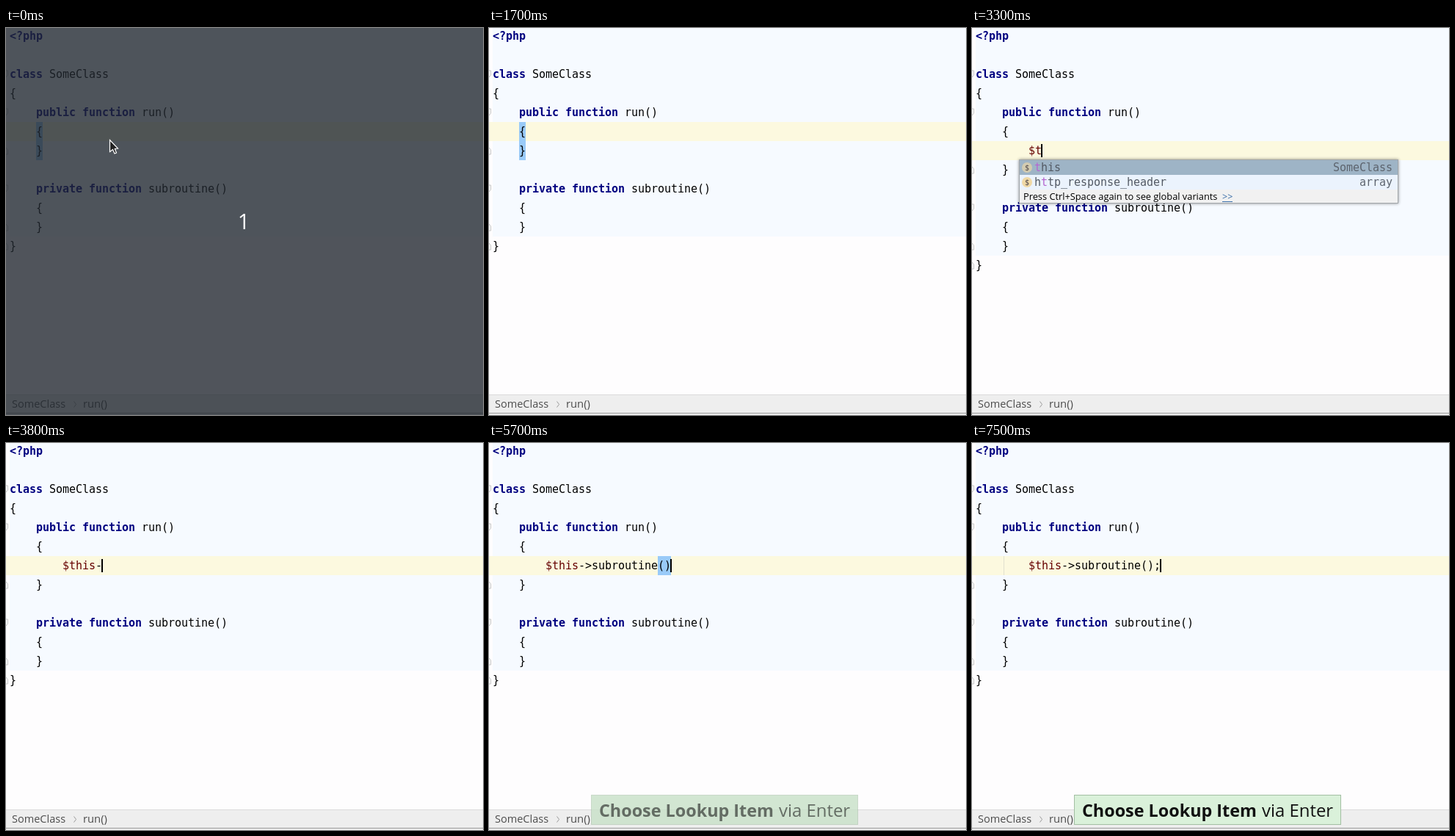
Write an HTML page with a canvas that moves like this. It is 650 px wide and 527 px high and loops after 8 s.

```html
<!DOCTYPE html>
<html lang="en">
<head>
<meta charset="utf-8">
<title>Code completion</title>
<style>
  html, body { margin: 0; width: 100%; height: 100%; overflow: hidden; }
  canvas { display: block; }
</style>
</head>
<body>
<canvas id="stage" width="650" height="527"></canvas>
<script>
const ctx = document.getElementById('stage').getContext('2d');
const LOOP = 8000, CHAR = 9, LINE = 26, LEFT = 5;

const STATEMENT = '$this->subroutine();';
// [time, number of visible characters]
const TYPING = [[2800, 1], [3300, 2], [3400, 3], [3500, 4], [3600, 5],
                [3800, 6], [3900, 7], [5600, 19], [7300, 20]];
const CARET_OFF = [[0, 100], [700, 1300], [1700, 2100], [4600, 5200], [7100, 7300]];

// *bold* marks keywords
const CODE = ['*<?php*', '', '*class* SomeClass', '{', '    *public function* run()', '    {', '    }', '',
              '    *private function* subroutine()', '    {', '    }', '}'];
const FOLD_OPEN = [2, 4, 8], FOLD_CLOSE = [6, 10, 11];

const THIS = { kind: '$', name: 'this', type: 'SomeClass' };
const HEADER = { kind: '$', name: 'http_response_header', type: 'array' };
const GLOBALS = [THIS, HEADER, ...['_COOKIE', '_ENV', '_FILES', '_GET', '_POST', '_REQUEST', '_SERVER',
  '_SESSION', 'GLOBALS', 'argv'].map(name => ({ kind: '$', name, type: 'array' }))];
const MEMBERS = [
  'm private subroutine () void', 'f public isTrue - bool', 'm public method () void', 'm public run () void',
  'm public provide () array|callable[]', 'f private amp - AMP',
  'f private anotherProperty - PhpMyAdmin\\SqlParser\\Statements\\Create…',
  'f public anotherPropertyWithPreslash - int[]|SplObjectStorage', 'f public argNode - PhpParser\\Node\\Arg',
  'f private combined - Bar[]|Foo[]', 'm public doSomething (a,_b) void', 'm public doSomethingElse (c) void',
].map(row => {
  const [kind, access, name, args, type] = row.split(' ');
  return { kind, access, name, args: args === '-' ? '' : args.replace('_', ' '), type };
});

function rect(x, y, w, h, color) {
  ctx.fillStyle = color;
  ctx.fillRect(x, y, w, h);
}

function mono(text, x, y, color, bold) {
  ctx.font = `${bold ? 'bold ' : ''}15px "DejaVu Sans Mono", monospace`;
  ctx.letterSpacing = '-0.03px';
  ctx.fillStyle = color;
  ctx.fillText(text, x, y);
}

function label(text, x, y, size, color, weight = 400) {
  ctx.font = `${weight} ${size}px "Open Sans", "Noto Sans", sans-serif`;
  ctx.letterSpacing = '0px';
  ctx.fillStyle = color;
  ctx.fillText(text, x, y);
}

function stroke(points, color, width = 1) {
  ctx.beginPath();
  points.forEach(([x, y]) => ctx.lineTo(x, y));
  ctx.strokeStyle = color;
  ctx.lineWidth = width;
  ctx.stroke();
}

function disc(x, y, r, color) {
  ctx.beginPath();
  ctx.arc(x, y, r, 0, 7);
  ctx.fillStyle = color;
  ctx.fill();
}

const lineTop = i => i * LINE - 2;
const baseline = i => i * LINE + 16;

function drawCode(inserted) {
  const place = i => i + (inserted && i > 5 ? 1 : 0);
  CODE.forEach((text, i) => {
    let x = LEFT;
    text.split('*').forEach((part, k) => {
      mono(part, x, baseline(place(i)), k % 2 ? '#000080' : '#000', k % 2);
      x += part.length * CHAR;
    });
  });
  const fold = (i, dir) => {
    const y = place(i) * LINE + 11;
    stroke([[0, y - 5 * dir], [2.5, y - 5 * dir], [2.5, y + dir], [0, y + 4 * dir]], '#c8c8c8');
  };
  FOLD_OPEN.forEach(i => fold(i, 1));
  FOLD_CLOSE.forEach(i => fold(i, -1));
}

function drawStatusBar() {
  rect(0, 499, 650, 28, '#eee');
  rect(0, 499, 650, 1, '#dadada');
  rect(0, 524, 650, 1, '#999');
  label('SomeClass', 8, 517, 14.5, '#4c4c4c');
  stroke([[92.5, 508.5], [95.5, 512.5], [92.5, 516.5]], '#999');
  label('run()', 105, 517, 14.8, '#4c4c4c');
}

function drawLock(x, y, open) {
  const color = open ? '#7db58a' : '#dc8c70';
  rect(x - 3, y, 7, 4, color);
  ctx.beginPath();
  ctx.arc(x + (open ? -3 : 0.5), y - 1, 2, Math.PI, 0);
  ctx.strokeStyle = color;
  ctx.lineWidth = 1;
  ctx.stroke();
}

function drawRow(row, i, popup) {
  const y = 190 + i * 20, x = popup.textX, bold = row.kind !== '$';
  ctx.globalAlpha = i ? 1 : 0.65;
  disc(popup.x + 11, y, 7, row.kind === 'm' ? '#ebc7d4' : '#f0d9a6');
  ctx.globalAlpha = 1;
  ctx.textAlign = 'center';
  label(row.kind, popup.x + 11, y + 3.5, 10, '#665e5c', bold ? 400 : 600);
  ctx.textAlign = 'left';
  if (row.access) drawLock(129, y, row.access === 'public');
  mono(row.name, x, y + 5, '#535a64', bold);
  (row.match || []).forEach(k => {
    rect(x + k * CHAR, y - 8, CHAR, 16, i ? '#ebf3fd' : '#9eb4c6');
    mono(row.name[k], x + k * CHAR, y + 5, '#b565d0');
  });
  if (row.args) mono(row.args, x + row.name.length * CHAR, y + 5, i ? '#b4bac2' : '#78858f');
  mono(row.type, popup.right - row.type.length * CHAR, y + 5, '#5d646e');
}

function drawPopup(popup) {
  const { x, w, rows } = popup;
  const bottom = Math.min(410, 180 + rows.length * 20);
  ctx.save();
  ctx.shadowColor = 'rgba(0,0,0,.45)';
  ctx.shadowBlur = 4;
  rect(x, 179, w, bottom - 160, '#a2a6aa');
  ctx.restore();
  rect(x + 1, 180, w - 2, bottom - 180, '#ebf3fd');
  rect(x + 1, 180, popup.selectW, 20, '#9eb4c6');
  rect(x + 1, bottom, w - 2, 18, '#f1f1f1');
  ctx.save();
  ctx.beginPath();
  ctx.rect(x, 180, w, bottom - 180);
  ctx.clip();
  rows.forEach((row, i) => drawRow(row, i, popup));
  ctx.restore();
  label(popup.hint, x + 6, bottom + 14, popup.hintSize, '#000');
  label('>>', popup.linkX, bottom + 14, 12.5, '#3a6ea8');
  rect(popup.linkX, bottom + 16, 14, 1, '#3a6ea8');
}

const variablePopup = rows => drawPopup({
  x: 64, w: 517, selectW: 515, textX: 85, right: 573, rows,
  hint: 'Press Ctrl+Space again to see global variants', hintSize: 12.8, linkX: 341,
});

function memberPopup() {
  drawPopup({
    x: 102, w: 560, selectW: 542, textX: 139, right: 638, rows: MEMBERS,
    hint: 'Ctrl+Down and Ctrl+Up will move caret down and up in the editor', hintSize: 12.6, linkX: 497,
  });
  rect(645, 180, 5, 230, '#f3f5f7');
  rect(648, 180, 2, 51, '#c9cdd1');
  ctx.strokeStyle = '#8fb0c8';
  ctx.lineWidth = 1;
  ctx.strokeRect(645.5, 411.5, 10, 16);
  label('?', 647, 424, 12, '#4f86b0');
}

function variableRows(count) {
  if (count === 1) return GLOBALS;
  const rows = [{ ...THIS, match: [0, 1, 2].slice(0, count - 1) }];
  if (count < 4) rows.push({ ...HEADER, match: count === 2 ? [1] : [1, 14] });
  return rows;
}

function drawBulb() {
  disc(19, 161, 4.5, '#f3cf57');
  rect(17, 165, 4, 2, '#f3cf57');
  rect(17, 167, 4, 3, '#8f8f8f');
}

function drawToast(alpha) {
  ctx.globalAlpha = alpha;
  rect(139, 479, 364, 41, '#a3bfa3');
  rect(140, 480, 362, 39, '#daf1da');
  label('Choose Lookup Item', 150, 509, 23.35, '#111', 700);
  label('via Enter', 395, 509, 23.9, '#111');
  ctx.globalAlpha = 1;
}

function drawCountdown() {
  rect(0, 0, 650, 527, 'rgba(34,40,48,.79)');
  ctx.textAlign = 'center';
  label('1', 324, 274, 29, '#fff');
  ctx.textAlign = 'left';
  ctx.beginPath();
  [[0, 0], [0, 16], [4, 13], [6.5, 18.5], [9, 17.5], [6.8, 12], [11, 11.5]]
    .forEach(([x, y]) => ctx.lineTo(141.5 + x, 152.5 + y));
  ctx.closePath();
  ctx.fillStyle = '#222';
  ctx.strokeStyle = '#fff';
  ctx.lineWidth = 1.2;
  ctx.fill();
  ctx.stroke();
}

function draw(t) {
  const during = (from, to) => t >= from && t < to;
  const inserted = t >= 2100;
  const current = inserted ? 6 : 5;
  const count = TYPING.reduce((n, [time, chars]) => t >= time ? chars : n, 0);

  rect(0, 0, 650, 527, '#fefdfe');
  rect(LEFT, 0, 645, inserted ? 310 : 284, '#f6faff');
  rect(0, lineTop(current), 650, LINE, '#fcf9df');
  if (!inserted) rect(41, 128, CHAR, 2 * LINE, '#99caf8');
  if (during(5600, 7500)) rect(230, 154, 2 * CHAR, LINE, '#99caf8');
  if (t >= 6000) rect(43, 154, 1, LINE, '#e2e0d0');

  drawCode(inserted);
  mono(STATEMENT.slice(0, Math.min(count, 5)), 77, baseline(6), count > 1 ? '#660000' : '#000');
  mono(STATEMENT.slice(5, Math.max(count, 5)), 122, baseline(6), '#000');
  if (!CARET_OFF.some(([from, to]) => during(from, to))) {
    rect(inserted ? 76 + count * CHAR : 49, lineTop(current) + 4, 2, 18, '#000');
  }
  if (during(6600, 7500)) drawBulb();
  drawStatusBar();

  if (during(3000, 3600)) variablePopup(variableRows(count));
  if (during(4000, 5600)) memberPopup();
  if (t >= 5700) drawToast(Math.min(1, 0.57 * Math.floor((t - 5600) / 100)));
  if (t < 100) drawCountdown();
}

function tick() {
  draw(performance.now() % LOOP);
  requestAnimationFrame(tick);
}
tick();
</script>
</body>
</html>
```
